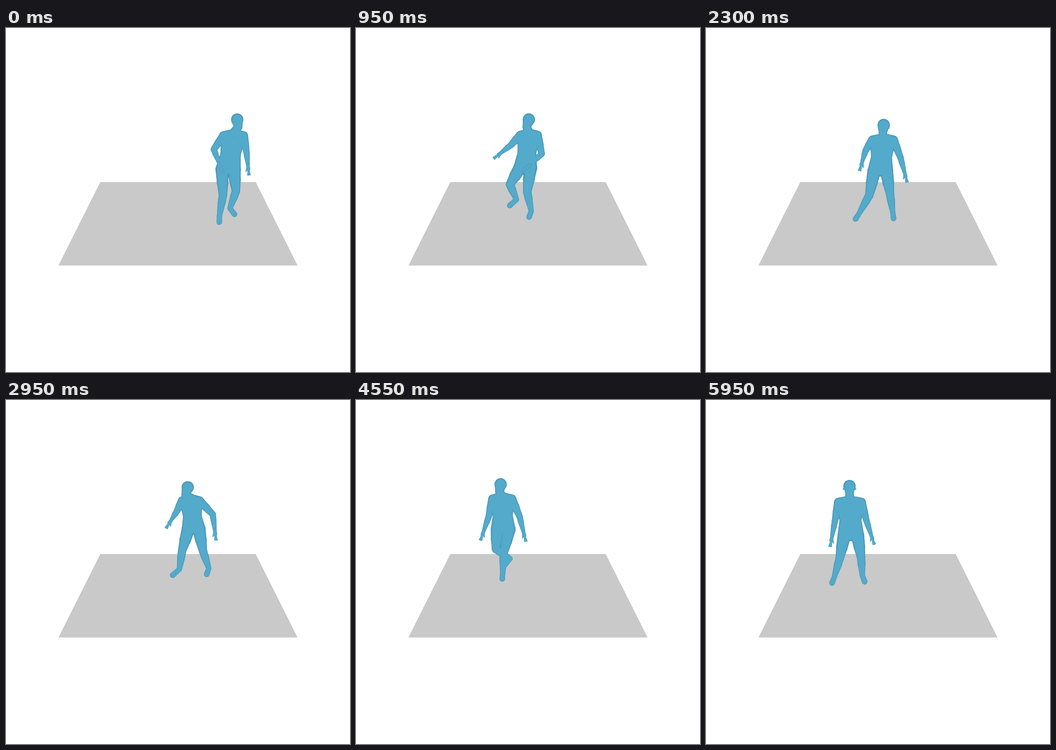
An HTML page with a canvas that plays this animation: 748x748 px, repeating every 6000 ms.

```html
<!DOCTYPE html>
<html lang="en">
<head>
<meta charset="utf-8">
<title>Walking figure</title>
<style>
html, body { margin: 0; width: 100%; height: 100%; overflow: hidden; background: #fff; }
canvas { display: block; }
</style>
</head>
<body>
<canvas id="stage" width="748" height="748"></canvas>
<script>
const ctx = document.getElementById('stage').getContext('2d');
const LOOP = 6000, STEP = 50;

// A pose holds the turn of the body, chest and hip centres, and the end
// (wrist or ankle) of each limb with the outward bend of its middle joint.
const pose = (turn, chest, hips, armA, armB, legA, legB) =>
  ({ turn: [turn], chest, hips, armA, armB, legA, legB });

const start = pose(.4, [495, 234], [483, 307],
  [463, 293, 16], [526, 298, 1], [464, 409, -5], [487, 392, 9]);
const reach = pose(-.8, [376, 233], [368, 304],
  [317, 270, -2], [378, 298, 19], [349, 373, 18], [381, 398, -8]);
const wide = pose(0, [378, 237], [366, 308],
  [332, 285, 6], [422, 311, -3], [313, 401, -13], [390, 400, 2]);
const lean = pose(-.8, [402, 219], [408, 280],
  [360, 260, -1], [454, 283, 12], [377, 368, 3], [441, 366, -3]);
const lunge = pose(-.4, [421, 217], [415, 277],
  [373, 278, 1], [459, 282, 6], [356, 352, 3], [439, 361, 0]);
const stride = pose(-.5, [318, 215], [320, 281],
  [278, 284, -2], [364, 286, 3], [335, 345, 20], [319, 376, -4]);
const stand = pose(0, [313, 222], [315, 295],
  [274, 297, 0], [359, 293, -1], [279, 385, -2], [340, 382, 2]);

// The same pose elsewhere, with the hands held further apart.
function move(p, dx, dy, spread = 0) {
  const shift = ([x, y, bend], side = 0) =>
    [x + dx + side * spread, y + dy - Math.abs(side) * spread * .6, bend];
  return pose(p.turn[0], shift(p.chest), shift(p.hips),
    shift(p.armA, -1), shift(p.armB, 1), shift(p.legA), shift(p.legB));
}

const keys = [
  [0, start],
  [950, reach],
  [1100, move(reach, -2, -9)],
  [1350, move(wide, -8, 0, 28)],
  [1700, wide],
  [2150, move(wide, 4, 5)],
  [2550, move(lean, -11, 23)],
  [2950, lean],
  [3300, move(lunge, 2, -7, 12)],
  [3650, lunge],
  [4550, stride],
  [5400, move(stand, -24, 3, 14)],
  [5950, stand]
];

// Smooth cubic through the key poses.
function poseAt(t) {
  let i = 0;
  while (i < keys.length - 2 && t >= keys[i + 1][0]) i++;
  const [a, b] = [keys[i], keys[i + 1]];
  const before = keys[Math.max(i - 1, 0)], after = keys[Math.min(i + 2, keys.length - 1)];
  const span = b[0] - a[0], f = (t - a[0]) / span, g = 1 - f, out = {};
  for (const k in a[1]) out[k] = a[1][k].map((v, n) => {
    const w = b[1][k][n];
    const m0 = (w - before[1][k][n]) / (b[0] - before[0]) * span;
    const m1 = (after[1][k][n] - v) / (after[0] - a[0]) * span;
    return g * g * (1 + 2 * f) * v + f * f * (3 - 2 * f) * w + f * g * (g * m0 - f * m1);
  });
  return out;
}

const mix = (a, b, f) => a + (b - a) * f;
const lerp = (p, q, f) => [mix(p[0], q[0], f), mix(p[1], q[1], f)];

// Root, middle joint and end of a limb; side is -1 or 1.
function joints(root, [x, y, bend], side) {
  const dx = x - root[0], dy = y - root[1], len = Math.hypot(dx, dy);
  const [mx, my] = lerp(root, [x, y], .55), out = side * bend / len;
  return [root, [mx + dy * out, my - dx * out], [x, y]];
}

function skeleton({ turn: [turn], chest, hips, armA, armB, legA, legB }) {
  const away = Math.abs(turn);
  const beside = ([x, y], d) => [x + d, y];
  const shoulder = 25 - 8 * away, hip = 14.5 - 4 * away;
  const skull = [chest[0] + (chest[0] - hips[0]) * .48 + turn * 5,
                 chest[1] + (chest[1] - hips[1]) * .48];
  return {
    turn, chest, hips, skull,
    chin: [skull[0] + turn * 6, skull[1] + 16],
    arms: [joints(beside(chest, -shoulder), armA, -1), joints(beside(chest, shoulder), armB, 1)],
    legs: [joints(beside(hips, -hip), legA, -1), joints(beside(hips, hip), legB, 1)]
  };
}

function fillShape(points) {
  ctx.beginPath();
  points.forEach(p => ctx.lineTo(...p));
  ctx.fill();
}

function disc([x, y], r) {
  ctx.beginPath();
  ctx.arc(x, y, r, 0, 7);
  ctx.fill();
}

// Tapered capsule
function taper(p, r, q, s) {
  const a = Math.atan2(q[1] - p[1], q[0] - p[0]) + Math.PI / 2;
  const c = Math.cos(a), n = Math.sin(a);
  const off = ([x, y], d) => [x + c * d, y + n * d];
  fillShape([off(p, r), off(q, s), off(q, -s), off(p, -r)]);
  disc(p, r);
  disc(q, s);
}

// Two bones, each with a muscle between its joints.
function limb([root, mid, end], [r0, upper, r1, lower, r2], k) {
  const u = lerp(root, mid, .5), l = lerp(mid, end, .35);
  taper(root, r0 * k, u, upper * k);
  taper(u, upper * k, mid, r1 * k);
  taper(mid, r1 * k, l, lower * k);
  taper(l, lower * k, end, r2 * k);
}

function hand([, elbow, wrist], side, k) {
  const a = Math.atan2(wrist[1] - elbow[1], wrist[0] - elbow[0]);
  const at = (turn, d) => [wrist[0] + Math.cos(a + turn) * d, wrist[1] + Math.sin(a + turn) * d];
  const palm = at(0, 9);
  taper(wrist, 3.8 * k, palm, 4 * k);
  for (const turn of [-.12, 0, .12]) taper(palm, 1.8 * k, at(turn, 22), 1.1 * k);
  taper(wrist, 2 * k, at(side * .4, 14), 1.2 * k);
}

function torso({ chest, hips, chin, arms, legs }, k) {
  const neck = [chest[0], chest[1] - 5];
  const [[sa], [sb]] = arms, [[ha], [hb]] = legs;
  const row = (down, inset, r) => {
    const a = lerp(sa, ha, down), b = lerp(sb, hb, down);
    return [lerp(a, b, inset), lerp(b, a, inset), r * k];
  };
  const rows = [row(.05, .11, 10), row(.55, .11, 9), row(1, 0, 14.5)];
  for (let i = 0; i < 2; i++) {
    const [a, b, r] = rows[i], [c, d, s] = rows[i + 1];
    taper(a, r, c, s);
    taper(b, r, d, s);
    fillShape([a, b, d, c]);
  }
  disc([hips[0], hips[1] - 2], 14 * k);
  for (const s of [sa, sb]) taper(neck, 9.5 * k, s, 9.5 * k);
  taper(chin, 9 * k, neck, 10.5 * k);
}

function head({ skull, chin, turn }, k) {
  taper(skull, 13.3 * k, chin, 9 * k);
  const ear = 12 * (1 - Math.abs(turn) / 2);
  for (const side of [-1, 1]) disc([skull[0] + side * ear, skull[1] + 6], 2.5 * k);
}

const tones = [['#4590b0', 1], ['#4d9fc0', .91], ['#54aaca', .78]];

function figure(p) {
  const body = skeleton(p);
  for (const [color, k] of tones) {
    ctx.fillStyle = color;
    body.legs.forEach((leg, i) => {
      const [x, y] = leg[2];
      limb(leg, [14.5, 12.5, 9, 8.5, 5.5], k);
      taper(leg[2], 5.5 * k, [x + body.turn * 12 + (i ? 5 : -5), y + 13], 6 * k);
    });
    torso(body, k);
    for (const arm of body.arms) limb(arm, [9.5, 8.5, 6.8, 6.3, 4], k);
    head(body, k);
  }
  for (const [color, k] of tones) {
    ctx.fillStyle = color;
    body.arms.forEach((arm, i) => hand(arm, i ? 1 : -1, k));
  }
}

function frame(now) {
  ctx.fillStyle = '#fff';
  ctx.fillRect(0, 0, 748, 748);
  ctx.fillStyle = '#c9c9c9';
  fillShape([[205, 335], [543, 335], [634, 516.5], [114, 516.5]]);
  figure(poseAt(Math.floor(now % LOOP / STEP) * STEP));
  requestAnimationFrame(() => frame(performance.now() - began));
}

const began = performance.now();
frame(0);
</script>
</body>
</html>
```
